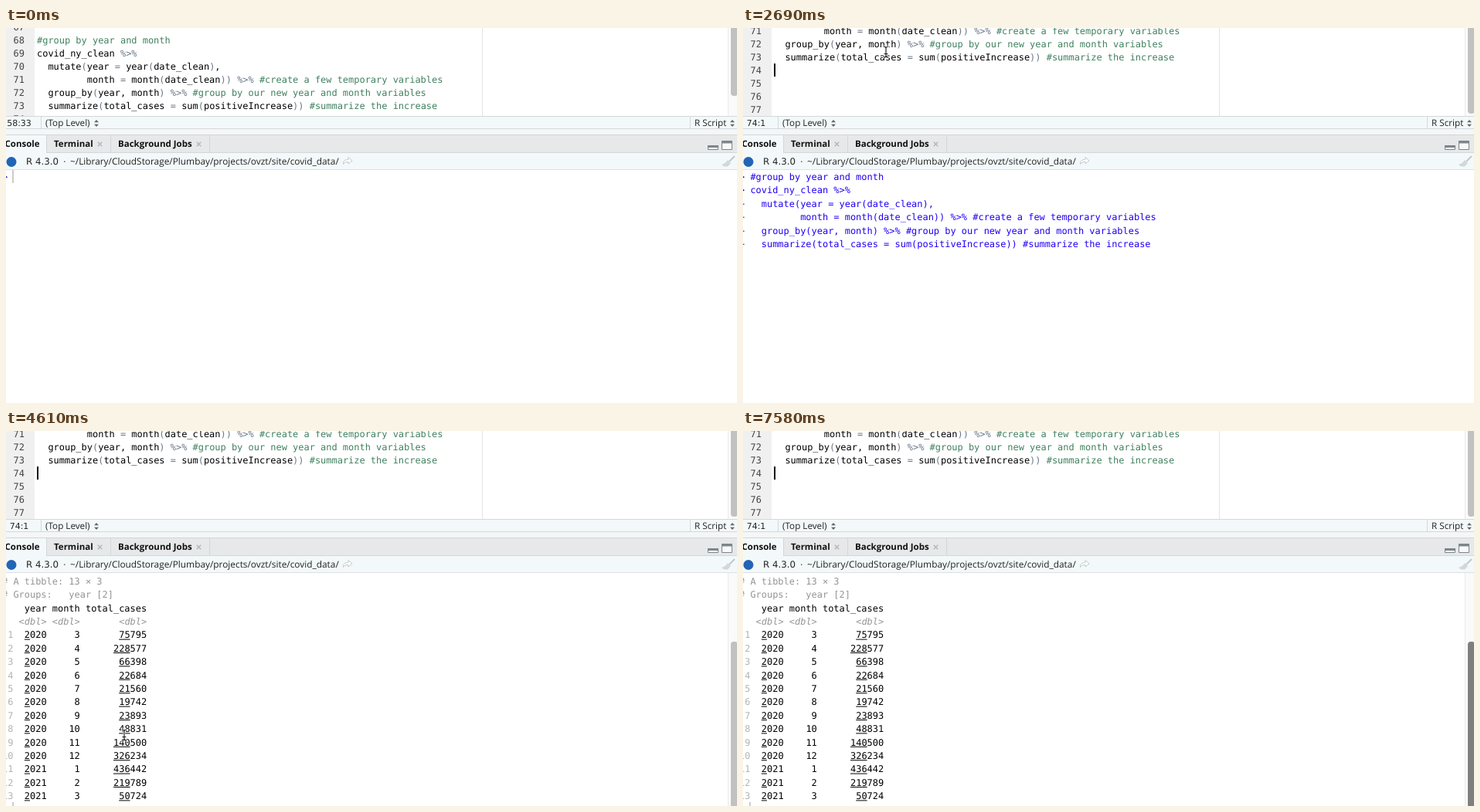
Animation, 946 px wide and 486 px high, one loop 8030 ms. Source, as an HTML page:

```html
<!DOCTYPE html>
<html lang="en">
<head>
<meta charset="utf-8">
<title>Console run</title>
<style>
html, body { margin: 0; width: 100%; height: 100%; overflow: hidden; background: #fff; }
svg { display: block; }
text { white-space: pre; text-rendering: geometricPrecision; }
.mono { font: 11.96px "DejaVu Sans Mono", monospace; }
.ui { font: 11.7px "Open Sans", sans-serif; fill: #222; }
.num { font: 11px "DejaVu Sans", sans-serif; fill: #222; }
.tab { font: bold 11.5px "Open Sans", sans-serif; fill: #111; }
.line { fill: #444; }
.op { fill: #687687; }
.note { fill: #40805f; }
.echo { fill: #2000f5; }
.dim { fill: #949494; }
.index { fill: #b4b4b4; }
.type { fill: #949494; font-style: italic; }
</style>
</head>
<body>
<svg id="stage" width="946" height="486" viewBox="0 0 946 486">
  <defs>
    <clipPath id="pane"><rect width="946" height="114"/></clipPath>
    <path id="updown" d="M-3 -1.2L0 -4.4L3 -1.2ZM-3 1.2L0 4.4L3 1.2Z" fill="#666"/>
    <path id="close" d="M-2.7 -2.7L2.7 2.7M2.7 -2.7L-2.7 2.7" stroke="#b4b8bb" stroke-width="1.5"/>
  </defs>
  <rect width="946" height="486" fill="#fff"/>

  <g clip-path="url(#pane)">
    <rect width="37" height="114" fill="#f0f0f0"/>
    <rect x="616" width="1" height="114" fill="#e4e4e4"/>
    <g id="code"></g>
    <rect x="934" width="12" height="114" fill="#fafafa"/>
    <rect x="934" width="1" height="114" fill="#ebebeb"/>
    <rect id="thumb" x="938" y="-40" width="9" rx="4" fill="#c1c1c1"/>
  </g>

  <g id="bars">
    <rect y="114" width="946" height="17" fill="#f3f9fa"/>
    <path d="M0 114.5H946M0 130.5H946M45.5 115V130M885.5 115V130" stroke="#d3d8da"/>
    <use href="#updown" x="117" y="123.5"/>
    <use href="#updown" x="940" y="123.5"/>
    <rect y="131" width="946" height="7" fill="#f4f6f7"/>
    <rect y="138" width="946" height="24" fill="#e6e8ea"/>
    <rect y="139" width="52" height="24" fill="#f3f9fa"/>
    <path d="M0 138.5H946M52.5 139V162M135.5 139V162M263.5 139V162M52 161.5H946" stroke="#d3d7d9"/>
    <use href="#close" x="121.5" y="150.5"/>
    <use href="#close" x="249.5" y="150.5"/>
    <path d="M908.5 152.5H921.5V157.5H908.5ZM926.5 146.5H939.5V157.5H926.5Z" fill="#f8fafa" stroke="#7d868b"/>
    <path d="M908 153.5H922M926 148H940" stroke="#7d868b" stroke-width="3"/>
    <rect y="162" width="946" height="21" fill="#f3f9fa"/>
    <rect y="183" width="946" height="1" fill="#dde1e3"/>
    <circle cx="7" cy="173.5" r="6.5" fill="#2264b5"/>
    <path d="M436.5 176.5C436 172 439 170.5 443 170.5V167.5L448 172L443 176V173.5C440 173.5 438 174 436.5 176.5Z" fill="#fff" stroke="#c3c8cb"/>
    <path d="M943 166L936 173" stroke="#c3c7c9" stroke-width="2"/>
    <path d="M934 171L938 175L934 179.5Q928 180 926 177Q931 176 934 171Z" fill="#d3d7d9"/>
  </g>

  <g id="ready"><rect x="8.5" y="184" width="1" height="17" fill="#999"/></g>
  <g id="echo"></g>
  <g id="table">
    <rect x="8.5" y="481" width="1" height="5" fill="#999"/>
    <rect x="934" y="184" width="12" height="302" fill="#fafafa"/>
    <rect x="934" y="184" width="1" height="302" fill="#ebebeb"/>
    <rect id="slider" x="938" y="273" width="9" height="230" rx="4"/>
  </g>

  <rect id="caret" width="2" height="17"/>
  <g id="beam" fill="none" stroke-linecap="round">
    <path d="M-3 -7Q0 -7 0 -5Q0 -7 3 -7M0 -5V5M-3 7Q0 7 0 5Q0 7 3 7M-2 2.5H2" stroke="#fff" stroke-width="2.6"/>
    <path d="M-3 -7Q0 -7 0 -5Q0 -7 3 -7M0 -5V5M-3 7Q0 7 0 5Q0 7 3 7M-2 2.5H2" stroke="#111" stroke-width="1.1"/>
  </g>
</svg>
<script>
const LOOP = 8030, RUN = 2690, RESULT = 2840, CLICK = 1190, HOVER = 7580;
const CHAR = 7.2, LEFT = -5, ROW = 17.4;
const $ = id => document.getElementById(id);

function node(parent, tag, attrs, content) {
  const el = document.createElementNS("http://www.w3.org/2000/svg", tag);
  for (const key in attrs) el.setAttribute(key, attrs[key]);
  if (content !== undefined) el.textContent = content;
  parent.append(el);
  return el;
}
const label = (parent, x, y, cls, str, anchor = "start") =>
  node(parent, "text", { x, y, class: cls, "text-anchor": anchor }, str);

// Editor
const script = [
  "#group by year and month",
  "covid_ny_clean %>%",
  "  mutate(year = year(date_clean),",
  "         month = month(date_clean)) %>% #create a few temporary variables",
  "  group_by(year, month) %>% #group by our new year and month variables",
  "  summarize(total_cases = sum(positiveIncrease)) #summarize the increase"
];
const tokenClass = s => s[0] === "#" ? "note" : /^(%>%|[=()])/.test(s) ? "op" : "";

for (let n = 67; n <= 77; n++) {
  const y = 20 + (n - 68) * 17;
  label($("code"), 9.5, y, "mono line", n);
  const row = label($("code"), 40, y, "mono", "");
  for (const part of (script[n - 68] || "").match(/#.*|%>%|[=()]|[^#%=()]+/g) || [])
    node(row, "tspan", { class: tokenClass(part) }, part);
}

// Bars
const bars = $("bars");
const place = label(bars, 17, 127, "num", "", "middle");
label(bars, 51, 127, "ui", "(Top Level)");
label(bars, 891, 127, "ui", "R Script");
label(bars, -1.5, 154, "tab", "Console");
label(bars, 62, 154, "tab", "Terminal");
label(bars, 145, 154, "tab", "Background Jobs");
label(bars, 26, 177, "num", "R 4.3.0").style.fontSize = "11.8px";
label(bars, 74, 177, "num", "·");
label(bars, 83, 177, "ui", "~/Library/CloudStorage/Plumbay/projects/ovzt/site/covid_data/").style.fontSize = "11.86px";

// Console
const put = (id, col, y, cls, str) => label($(id), LEFT + col * CHAR, y, "mono " + cls, str);

put("ready", 0, 197, "echo", ">");
script.forEach((str, i) => put("echo", 0, 197 + i * ROW, "echo", (i < 2 ? "> " : "+ ") + str));

const totals = [75795, 228577, 66398, 22684, 21560, 19742, 23893,
  48831, 140500, 326234, 436442, 219789, 50724];
const rowY = i => 198.7 + i * ROW;

function figure(end, y, value) {
  const str = String(value), big = Math.max(0, str.length - 3);
  put("table", end - str.length, y, "", str);
  if (big) node($("table"), "rect", {
    x: LEFT + (end - str.length) * CHAR, y: y + 1.3, width: big * CHAR, height: 1
  });
}

put("table", 0, rowY(0), "dim", "# A tibble: 13 × 3");
put("table", 0, rowY(1), "dim", "# Groups:   year [2]");
put("table", 4, rowY(2), "", "year month total_cases");
for (const col of [3, 9, 21]) put("table", col, rowY(3), "type", "<dbl>");
totals.forEach((total, i) => {
  const y = rowY(i + 4);
  put("table", 0, y, "index", String(i + 1).padStart(2));
  figure(8, y, i < 10 ? 2020 : 2021);
  figure(14, y, (i + 2) % 12 + 1);
  figure(26, y, total);
});

// Pointer moves: first step, last step, positions
const moves = [
  [440, 1190, [[270, 6], [240, 14], [212, 22], [195, 28], [186, 31], [185, 31]]],
  [3730, 4760, [[184, 60], [180, 130], [172, 230], [163, 310], [157, 355], [154, 380], [153, 394], [153, 418]]],
  [4910, 5360, [[155, 430], [157, 445], [158, 457], [158, 462]]],
  [6250, 7280, [[215, 466], [370, 472], [570, 477], [737, 479], [820, 478], [870, 476], [900, 474], [913, 473]]]
];
const caretOn = [[1190, 1790], [2240, 3290], [3730, 4170], [4610, 5210],
  [5660, 6250], [6690, 7140], [7580, LOOP]];

function pointer(t) {
  if (t >= HOVER) return null;
  const move = moves.filter(m => t >= m[0]).pop();
  if (!move) return null;
  const [start, end, points] = move, last = points.length - 1;
  const step = Math.floor((t - start + 4) / (end - start) * last);
  return points[Math.min(last, step)];
}

const show = (id, on) => { $(id).style.display = on ? "" : "none"; };

function render(t) {
  const ran = t >= RUN, done = t >= RESULT, spot = pointer(t);
  $("code").setAttribute("transform", `translate(0 ${ran ? -63 : 0})`);
  $("thumb").setAttribute("height", ran ? 151 : 128);
  place.textContent = ran ? "74:1" : t >= CLICK ? "69:19" : "58:33";
  show("ready", !ran);
  show("echo", ran && !done);
  show("table", done);
  $("slider").setAttribute("fill", t >= HOVER ? "#7f7f7f" : "#c1c1c1");
  show("caret", caretOn.some(([a, b]) => t >= a && t < b));
  $("caret").setAttribute("x", ran ? 40 : 170);
  $("caret").setAttribute("y", ran ? 46 : 24);
  show("beam", spot);
  if (spot) $("beam").setAttribute("transform", `translate(${spot})`);
}

const begin = performance.now();
function tick() {
  render((performance.now() - begin) % LOOP);
  requestAnimationFrame(tick);
}
tick();
</script>
</body>
</html>
```
